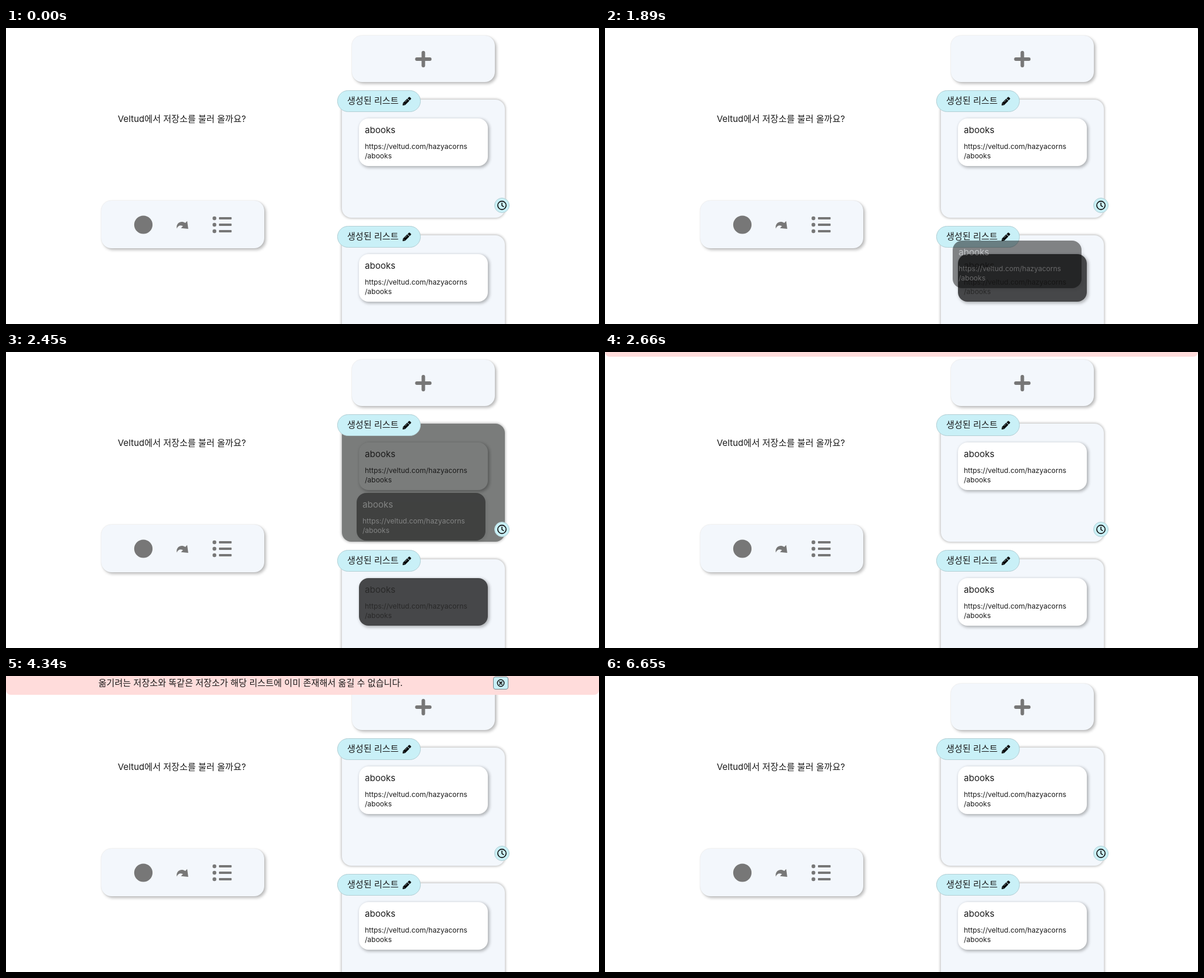
These frames come from a looping animation (1008x504 px, 6.93 s). An HTML page:

```html
<!DOCTYPE html>
<html lang="ko">
<head>
<meta charset="utf-8">
<title>저장소 리스트</title>
<style>
html, body { margin: 0; width: 100%; height: 100%; overflow: hidden; background: #777; }
#stage {
  position: relative; width: 1008px; height: 504px; overflow: hidden;
  background: #fff; color: #1b1b1b; border-radius: 0 2px 2px 0;
  font: 15.05px/20px Inter, "Noto Sans CJK KR", "Noto Sans CJK", sans-serif;
}
#stage div, #stage svg { position: absolute; box-sizing: border-box; }
.text { white-space: nowrap; }
.panel {
  border-radius: 17px; background: #f3f7fc;
  box-shadow: 3px 3px 5px rgba(0,0,0,.26), 0 0 2px rgba(0,0,0,.14);
}
.list {
  left: 571px; width: 277px; height: 201px; border-radius: 16px;
  background: #f3f7fc; box-shadow: 0 0 4px 1px rgba(0,0,0,.28);
}
.pill {
  left: 563px; width: 142px; height: 37px; border-radius: 19px;
  background: #c9f0f7; border: 1px solid #b3cfd4;
}
.clock {
  left: 830px; width: 26px; height: 26px; border-radius: 50%;
  background: #c9f0f7; border: 1px solid #b3cfd4;
}
.card {
  left: 600px; width: 219px; height: 81px; border-radius: 16px;
  background: #fff; box-shadow: 2px 2px 5px 1px rgba(0,0,0,.27);
}
.card .name { left: 10px; top: 10px; }
.card .url { left: 10px; top: 40px; font-size: 12px; line-height: 15.5px; }
.card.held { background: rgba(0,0,0,.71); color: #292929; }
.over { background: #7a7c7b; }
.card.clear { background: transparent; }
#ghost {
  background: #000; color: #8d8d8d; opacity: .47;
  box-shadow: 2px 2px 6px rgba(0,0,0,.2);
}
#banner {
  left: 0; top: 0; width: 1008px; height: 38px;
  background: #ffdcdb; border-radius: 0 0 8px 8px;
}
#close {
  left: 828px; top: 7px; width: 26px; height: 22px;
  border: 1px solid #74878c; border-radius: 4px; background: #d9e8eb;
}
</style>
</head>
<body>
<div id="stage"></div>
<script>
const stage = document.getElementById('stage');
const LOOP = 6930, STEP = 70, BANNER = 38;

function box(parent, cls, x, y, html = '') {
  const el = document.createElement('div');
  el.className = cls;
  if (x !== null) el.style.left = x + 'px';
  el.style.top = y + 'px';
  el.innerHTML = html;
  parent.append(el);
  return el;
}

function panel(x, y, w, h) {
  const el = box(stage, 'panel', x, y);
  el.style.width = w + 'px';
  el.style.height = h + 'px';
  return el;
}

const icon = (x, y, w, h, body) =>
  `<svg style="left:${x}px;top:${y}px" width="${w}" height="${h}" viewBox="0 0 ${w} ${h}">${body}</svg>`;

const pencil = icon(110, 10, 15, 15,
  `<path d="M.6 14.4 1.3 10.4 8 3.7 11.3 7 4.6 13.7Z" stroke="#000" stroke-width=".8" stroke-linejoin="round"/>
   <path d="M9 2.7 10.9.9Q11.7.3 12.5 1L14 2.5Q14.7 3.3 14.1 4.1L12.3 6Z" stroke="#000" stroke-width=".5" stroke-linejoin="round"/>
   <path d="M4.3 9.2 8.1 5.4M2 11.5 3.5 13" stroke="#c9f0f7" stroke-width=".7"/>`);

const clockFace = icon(4, 4, 16, 16,
  `<g fill="none" stroke="#111" stroke-width="1.6" stroke-linecap="round" stroke-linejoin="round">
   <circle cx="8" cy="8" r="7.1"/><path d="M8 4V8.3L10.6 10.2"/></g>`);

const cardText = `<div class="text name">abooks</div>
  <div class="text url">https://veltud.com/hazyacorns<br>/abooks</div>`;

function list(y) {
  const body = box(stage, 'list', null, y);
  const card = box(stage, 'card', null, y + 32, cardText);
  box(stage, 'pill', null, y - 16, `<div class="text" style="left:16px;top:7px">생성된 리스트</div>${pencil}`);
  box(stage, 'clock', null, y + 167, clockFace);
  return { body, card };
}

box(stage, 'text', 190, 145, 'Veltud에서 저장소를 불러 올까요?');

const rows = [8, 19, 30].map(y =>
  `<circle cx="3.3" cy="${y}" r="3.2"/><rect x="11" y="${y - 1.9}" width="21.5" height="3.8" rx="1"/>`).join('');
panel(162, 294, 277, 81).innerHTML =
  icon(55, 25, 34, 34, '<circle cx="16.5" cy="16" r="15.6" fill="#777"/>') +
  icon(127, 33, 24, 18,
    '<path d="M1.3 14.5C-.3 5.5 8.2-.1 15.6 5L19 1.8 20.8 15 8.5 13.8 11.8 10.3C7.4 7.7 3 9.6 1.3 14.5Z" fill="#777"/>') +
  icon(189, 22, 34, 38, `<g fill="#777">${rows}</g>`);

const add = panel(588, 13, 243, 79);
add.innerHTML = icon(107, 26, 30, 30,
  '<path d="M14.4 3V25M3.4 14H25.4" stroke="currentColor" stroke-width="6" stroke-linecap="round"/>');

const first = list(122), second = list(353);
const ghost = box(stage, 'card', 600, 386, cardText);
ghost.id = 'ghost';

const banner = box(stage, '', 0, 0,
  '<div class="text" style="left:157px;top:8px">옮기려는 저장소와 똑같은 저장소가 해당 리스트에 이미 존재해서 옮길 수 없습니다.</div>');
banner.id = 'banner';
const close = box(banner, '', 828, 7, icon(5, 3, 14, 14,
  `<g fill="none" stroke="#111" stroke-width="1.5" stroke-linecap="round">
   <circle cx="7" cy="7" r="5.7"/><path d="M5 5 9 9M9 5 5 9" stroke-width="1.8"/></g>`));
close.id = 'close';

// [time, value...] rows, linear between rows
const dragPath = [[1890, -9, -24], [2030, -8, -55], [2240, -6, -111], [2380, -4, -140], [2450, -4, -146]];
const bannerPath = [[2590, 0], [2660, 8], [2730, 31], [2800, 38], [4270, 38], [4340, 32], [4410, 10], [4480, 2], [4550, 0]];
const hoverPath = [[3360, 0], [3430, 1], [3500, .45], [3570, 0]];

function at(path, t) {
  if (t <= path[0][0]) return path[0].slice(1);
  for (let i = 1; i < path.length; i++) {
    const a = path[i - 1], b = path[i];
    if (t <= b[0]) {
      const k = (t - a[0]) / (b[0] - a[0]);
      return a.slice(1).map((v, j) => v + (b[j + 1] - v) * k);
    }
  }
  return path[path.length - 1].slice(1);
}

function draw(t) {
  const dragging = t >= 1890 && t < 2590;
  const over = t >= 2240 && t < 2590;
  const [dx, dy] = at(dragPath, t);
  ghost.style.visibility = dragging ? 'visible' : 'hidden';
  ghost.style.transform = `translate(${dx}px, ${dy}px)`;
  second.card.classList.toggle('held', dragging);
  first.body.classList.toggle('over', over);
  first.card.classList.toggle('clear', over);

  const [shown] = at(bannerPath, t);
  banner.style.visibility = shown > 0 ? 'visible' : 'hidden';
  banner.style.transform = `translateY(${shown - BANNER}px)`;
  close.style.background = t >= 3850 ? '#c9f0f7' : '';

  const [hover] = at(hoverPath, t);
  const grey = Math.round(119 - 51 * hover);
  add.style.color = `rgb(${grey}, ${grey}, ${grey})`;
  add.style.boxShadow =
    `3px 3px 5px rgba(0,0,0,${.26 + .24 * hover}), 0 0 2px rgba(0,0,0,${.14 + .16 * hover})`;
}

const start = performance.now();
function tick() {
  const t = (performance.now() - start) % LOOP;
  draw(Math.floor(t / STEP) * STEP);
  requestAnimationFrame(tick);
}
tick();
</script>
</body>
</html>
```
